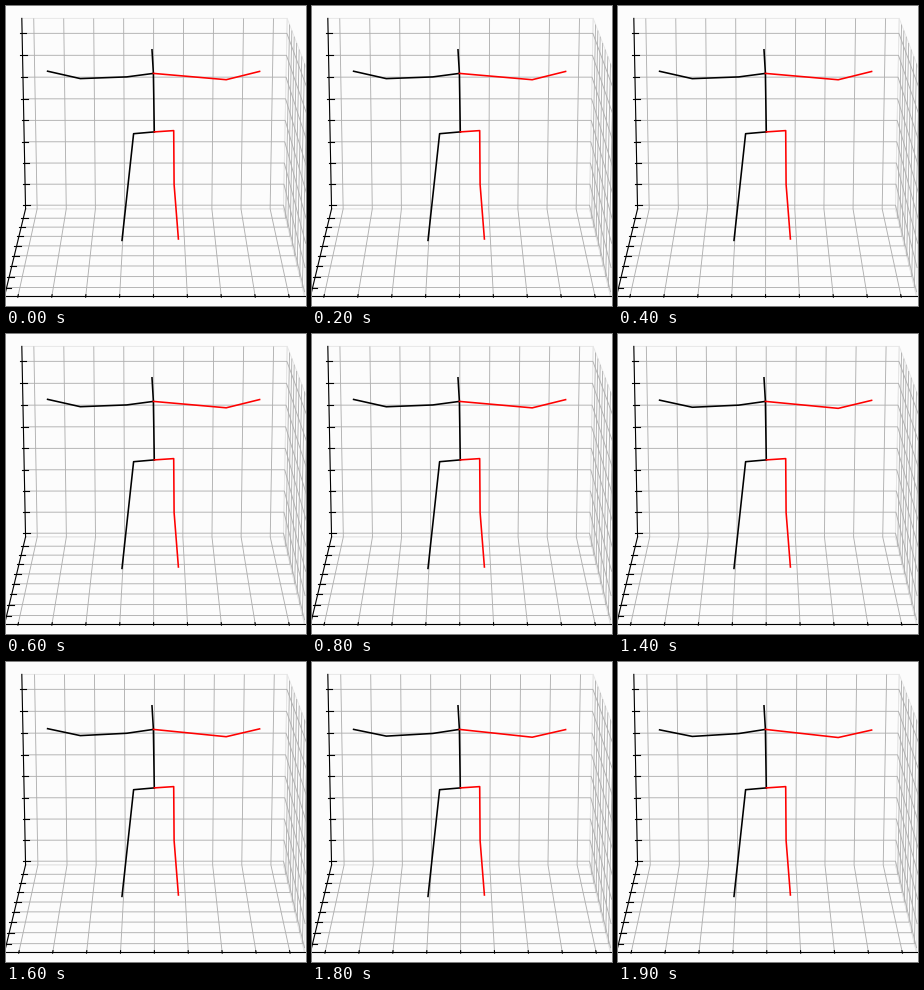
Animation, 300 px wide and 300 px high, one loop 2000 ms. Source, as a matplotlib script:

```python
import numpy as np
import matplotlib.pyplot as plt
from matplotlib.animation import FuncAnimation
from matplotlib.collections import LineCollection

SIZE, DPI = 300, 100
FRAMES, INTERVAL = 20, 100
PAPER, GRID, PANE = "#fcfcfc", "#b0b0b0", "#e6e6e6"
THIN, BONE = 0.65, 1.15

# Camera: 15 degrees above the floor, looking straight at the back wall
ELEV = np.radians(15)
DIST, FOCAL = 7.5, 1774
CX, CY = 148.5, 142.85

# Half sizes of the box, and of the box with its margin
SIDE, TALL = 0.5715, 0.4286
EDGE, RISE = SIDE * 25 / 24, TALL * 25 / 24
STEP = 0.2 * 2 * SIDE / 1.7
OUT, IN = EDGE + SIDE / 60, EDGE - SIDE / 30

# Joints of the figure on screen, at rest
HEAD, NECK, PELVIS = (146, 43.8), (147.4, 67.4), (148.3, 125.9)
L_ARM = [NECK, (120.7, 70.9), (74.3, 72.6), (41.6, 65.2)]
R_ARM = [NECK, (220.2, 73.7), (253.6, 65.4)]
L_LEG = [PELVIS, (127.6, 127.7), (116, 234.4)]
R_LEG = [PELVIS, (167.7, 124.6), (168.1, 178.5), (172.4, 233)]
SAG = 0.025


def project(x, depth, z):
    """Screen position of a point; depth grows toward the viewer."""
    up = z * np.cos(ELEV) - depth * np.sin(ELEV)
    near = depth * np.cos(ELEV) + z * np.sin(ELEV)
    scale = FOCAL / (DIST - near)
    return CX + x * scale, CY - up * scale


def path(*points):
    return [project(*p) for p in points]


def ticks(offset):
    """Evenly spaced positions inside the view, shifted by an offset."""
    t = np.arange(-6, 7) * STEP + offset
    return t[np.abs(t) <= SIDE]


def room(xs, ds):
    """Grid lines and tick marks for the given x and depth positions."""
    zs = np.arange(9) * STEP * TALL / SIDE - TALL
    grid = [path((x, EDGE, -RISE), (x, -EDGE, -RISE), (x, -EDGE, RISE)) for x in xs]
    grid += [path((-EDGE, d, -RISE), (EDGE, d, -RISE), (EDGE, d, RISE)) for d in ds]
    grid += [path((-EDGE, -EDGE, z), (EDGE, -EDGE, z), (EDGE, EDGE, z)) for z in zs]
    marks = [path((x, OUT, -RISE), (x, IN, -RISE)) for x in xs]
    marks += [path((-OUT, d, -RISE), (-IN, d, -RISE)) for d in ds]
    marks += [path((-OUT, -EDGE, z), (-IN, -EDGE, z)) for z in zs]
    return grid, marks


def swing(arm, amount):
    """Lower each joint in proportion to its distance from the neck."""
    x, y = np.array(arm).T
    return x, y + amount * SAG * np.abs(x - NECK[0])


fig = plt.figure(figsize=(SIZE / DPI, SIZE / DPI), dpi=DPI, facecolor=PAPER)
ax = fig.add_axes([0, 0, 1, 1])
ax.set(xlim=(0, SIZE), ylim=(SIZE, 0))
ax.axis("off")


def stroke(points, color, width, z):
    return ax.plot(*zip(*points), color=color, lw=width, zorder=z,
                   solid_capstyle="projecting")[0]


# Pale outlines of the floor, back wall and right wall
loop = [(-1, -1), (1, -1), (1, 1), (-1, 1), (-1, -1)]
stroke(path(*[(a * EDGE, b * EDGE, -RISE) for a, b in loop]), PANE, THIN, 1)
stroke(path(*[(a * EDGE, -EDGE, b * RISE) for a, b in loop]), PANE, THIN, 1)
stroke(path(*[(EDGE, a * EDGE, b * RISE) for a, b in loop]), PANE, THIN, 1)

stroke(path((-EDGE, -EDGE, RISE), (-EDGE, -EDGE, -RISE)), "black", 0.8, 3)
stroke(path((-EDGE, -EDGE, -RISE), (-EDGE, EDGE, -RISE)), "black", 0.8, 3)
stroke(path((-EDGE, EDGE, -RISE), (EDGE, EDGE, -RISE)), "black", 0.8, 3)

grid_lines = ax.add_collection(LineCollection([], colors=GRID, linewidths=THIN, zorder=2))
tick_lines = ax.add_collection(LineCollection([], colors="black", linewidths=0.8,
                                              capstyle="projecting", zorder=3))

stroke([HEAD, NECK, PELVIS], "black", BONE, 4)
stroke(L_LEG, "black", BONE, 4)
stroke(R_LEG, "red", BONE, 4)
left = stroke(L_ARM, "black", BONE, 4)
right = stroke(R_ARM, "red", BONE, 4)


def draw(i):
    t = i / (FRAMES - 1)
    grid, marks = room(ticks(-0.004 + 0.005 * t ** 2), ticks(-0.047 + 0.002 * t ** 2))
    grid_lines.set_segments(grid)
    tick_lines.set_segments(marks)
    sag = 0.15 * t + 0.85 * t ** 4
    left.set_data(*swing(L_ARM, sag))
    right.set_data(*swing(R_ARM, sag))
    return [grid_lines, tick_lines, left, right]


anim = FuncAnimation(fig, draw, frames=FRAMES, interval=INTERVAL,
                     init_func=lambda: draw(0), repeat=True, repeat_delay=0)
plt.show()
```
